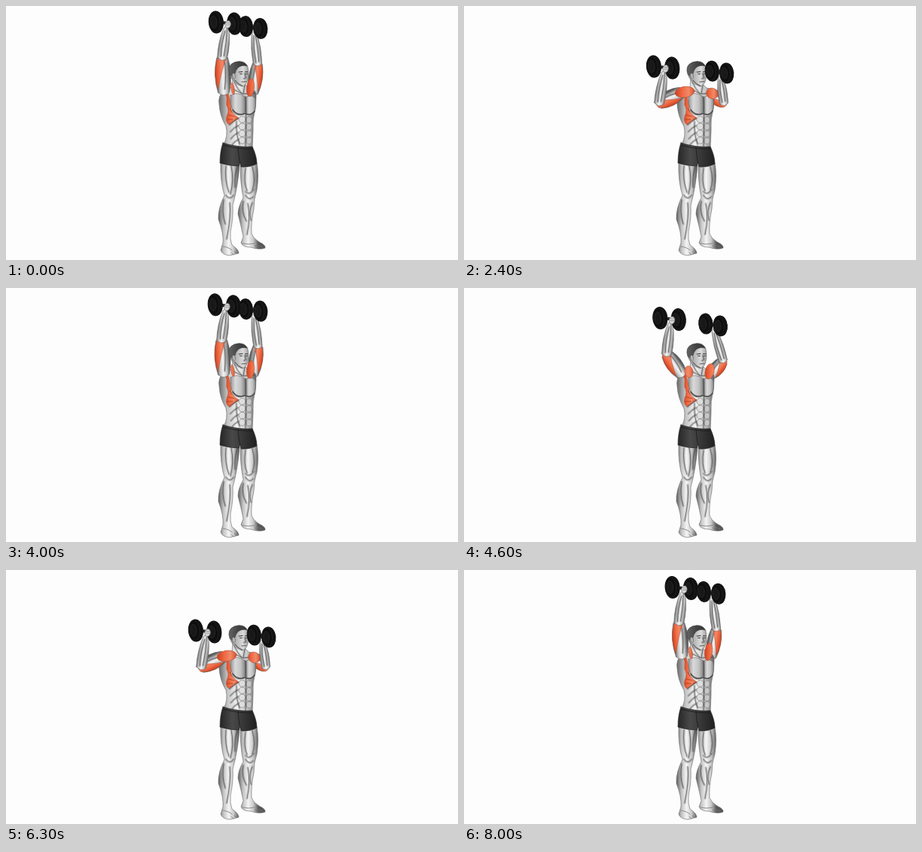
An HTML page with a canvas that plays this animation: 600 px wide and 338 px high, repeating every 8100 ms.

```html
<!DOCTYPE html>
<html lang="en">
<head>
<meta charset="utf-8">
<title>Dumbbell overhead press</title>
<style>
html, body { margin: 0; width: 100%; height: 100%; overflow: hidden; background: #fefdfe; }
canvas { display: block; width: 600px; height: 338px; }
</style>
</head>
<body>
<canvas id="stage"></canvas>
<script>
const canvas = document.getElementById('stage');
const ctx = canvas.getContext('2d');
const dpr = window.devicePixelRatio || 1;
canvas.width = 600 * dpr;
canvas.height = 338 * dpr;

const LOOP = 8100, REP = 3900, STEP = 100;
const SKIN = ['#5c5c5c', '#c4c4c4', '#f4f4f4', '#c9c9c9', '#585858'];
const PEC = ['#8c8c8c', '#d9d9d9', '#c2c2c2', '#777'];
const RED = ['#c93f1d', '#ee6640', '#f28a68', '#d34a29'];

// time within one repetition -> height of the near dumbbell
const LIFT = [[0, 22.5], [200, 24], [400, 28], [600, 35], [700, 41], [900, 53], [1100, 67.5],
  [1300, 77], [1500, 81.5], [1900, 82], [2400, 81.5], [2550, 74], [2700, 62], [3000, 42],
  [3300, 30], [3600, 24], [3900, 22.5]];

// dumbbell height -> near hand x, near elbow, far hand, far elbow
const POSES = [
  [22.5, 291, 287, 69, 328, 28.5, 334, 77],
  [30, 280, 278, 77, 328, 37.5, 339, 86],
  [41, 272.5, 269, 88, 330.5, 49, 344, 97],
  [67.5, 266, 259, 118, 336.5, 74.5, 345, 121],
  [82, 264, 259, 130, 339, 88.5, 345, 130]
];

function sample(rows, x) {
  let i = 1;
  while (i < rows.length - 1 && rows[i][0] < x) i++;
  const a = rows[i - 1], b = rows[i];
  const k = Math.min(1, Math.max(0, (x - a[0]) / (b[0] - a[0])));
  return a.slice(1).map((v, j) => v + (b[j + 1] - v) * k);
}

function ramp(x0, y0, x1, y1, colors) {
  const g = ctx.createLinearGradient(x0, y0, x1, y1);
  colors.forEach((c, i) => g.addColorStop(i / (colors.length - 1), c));
  return g;
}

function line(d, color = '#777', width = 0.8) {
  ctx.strokeStyle = color;
  ctx.lineWidth = width;
  ctx.stroke(new Path2D(d));
}

function fill(d, x0, x1, colors, edge = '#666') {
  ctx.fillStyle = ramp(x0, 0, x1, 0, colors);
  ctx.fill(new Path2D(d));
  line(d, edge, 0.6);
}

// soft shadow with a thin dark core between muscles
function groove(d) {
  line(d, 'rgba(70,70,70,.22)', 3.2);
  line(d, 'rgba(60,60,60,.75)', 0.8);
}

function oval(x, y, rx, ry, tilt, color, edge) {
  ctx.beginPath();
  ctx.ellipse(x, y, rx, ry, tilt, 0, 7);
  ctx.fillStyle = color;
  ctx.fill();
  if (edge) {
    ctx.strokeStyle = edge;
    ctx.lineWidth = 0.6;
    ctx.stroke();
  }
}

// tapered limb from a to b; half widths at start, middle and end
function limb(a, b, w0, wm, w1, detail) {
  const dx = b[0] - a[0], dy = b[1] - a[1], len = Math.hypot(dx, dy);
  ctx.save();
  ctx.translate(...a);
  ctx.rotate(Math.atan2(dy, dx));
  const d = `M0 ${-w0}Q${len / 2} ${-wm} ${len} ${-w1}Q${len + w1} 0 ${len} ${w1}` +
    `Q${len / 2} ${wm} 0 ${w0}Q${-w0} 0 0 ${-w0}Z`;
  ctx.fillStyle = ramp(0, -w0 - 1, 0, w0 + 1, SKIN);
  ctx.fill(new Path2D(d));
  line(d, '#666', 0.6);
  detail(len);
  ctx.restore();
}

function arm(shoulder, elbow, hand, side, size) {
  limb(shoulder, elbow, 7.5 * size, 13.5 * size, 7.5 * size, n => {
    const w = 8 * size * side;
    groove(`M${n * .1} ${-w * .2}Q${n * .5} ${-w * .6} ${n * .85} ${-w * .4}`);
    const tri = `M${n * .1} ${w * .9}Q${n * .6} ${w * 1.8} ${n + 3} ${w * .6}` +
      `Q${n + 6} ${-w * .5} ${n * .95} ${-w * .6}Q${n * .7} ${w * .1} ${n * .1} ${w * .9}Z`;
    ctx.fillStyle = ramp(0, w * 1.3, 0, -w * .6, RED);
    ctx.fill(new Path2D(tri));
    line(tri, '#b5482c', 0.5);
  });
  const wrist = [hand[0] + 1.5, hand[1] + 7];
  limb(elbow, wrist, 6.5 * size, 8.5 * size, 3.4, n => {
    groove(`M2 -2Q${n * .5} -4 ${n * .9} -1M3 2Q${n * .5} 3 ${n} 1`);
  });
}

function plates(x, y, rx, ry) {
  oval(x, y, rx, ry, -.08, '#0a0a0a');
  oval(x + 2, y, rx * .75, ry * .93, -.08, '#111', '#242424');
  oval(x - 2, y, rx * .72, ry * .9, -.08, '#0e0e0e', '#2b2b2b');
  oval(x - 3, y, rx * .42, ry * .55, -.08, '#181818', '#303030');
}

function dumbbell(x, y, gap, rx, ry, tilt) {
  line(`M${x - gap} ${y - tilt}L${x + gap} ${y + tilt}`, '#222', 4);
  plates(x - gap, y - tilt, rx, ry);
  plates(x + gap, y + tilt, rx, ry);
}

function fist(x, y) {
  oval(x, y, 3.8, 5, .2, '#d4d4d4', '#666');
  line(`M${x - 2} ${y - 2}h5m-5 2.5h5`, '#777', 0.6);
}

function legs() {
  fill('M311 211Q311 237 315 255Q308 267 308 277Q312 292 315 307L312 315Q314 321 325 321Q336 325 344 322' +
    'Q345 318 336 314Q328 309 326 303Q325 288 329 270Q329 256 333 245Q336 225 333 209Z', 308, 335, SKIN);
  groove('M318 216Q315 235 320 246M327 214Q332 232 327 245M318 247Q323 253 329 244M318 252Q323 260 328 254' +
    'M315 260Q312 274 319 286M321 263Q325 280 320 304M327 262Q322 272 325 285');
  line('M314 316Q322 318 330 316M333 318l7 3M330 319l6 3');
  fill('M285 207Q284 233 290 252Q281 270 282 284Q289 302 288 315L285 325Q287 331 297 332L309 329' +
    'Q309 324 300 318Q297 311 298 300Q302 281 301 265Q308 240 310 211Z', 282, 309, SKIN);
  groove('M292 213Q290 232 296 248M299 213Q303 232 298 250M307 214Q303 225 304 241M292 252Q297 259 302 252' +
    'M289 258Q286 275 291 290M297 262Q299 280 293 310');
  line('M288 320Q296 321 300 325M299 328l3 3M303 327l3 2');
}

function torso() {
  fill('M301 96L300 108L289 112Q281 120 283 131Q284 147 292 160Q295 173 289 184L327 189L328 165Q327 150 331 137' +
    'L332 122Q333 110 322 109L317 104Z', 281, 333, SKIN);
  groove('M303 101Q307 110 313 117M317 105L315 117M302 111Q310 115 315 117L330 116');
  fill('M293 121Q289 113 291 107Q298 121 299 139Q303 146 309 149Q303 153 296 158Q291 154 293 147' +
    'Q297 138 293 132Z', 290, 309, RED, '#b5482c');
  line('M295 145l8 2M294 151l7 0M297 136l3 5', '#a53818');
  fill('M298 119Q307 113 318 121Q320 138 316 144Q306 148 301 140Q297 130 298 119Z', 297, 319, PEC);
  fill('M319 121Q326 117 331 123Q333 136 328 143Q322 146 318 142Z', 318, 332, PEC);
  line('M301 138Q307 147 317 143Q324 147 330 140', '#4a4a4a', 1.4);
  for (let i = 0; i < 4; i++) {
    const y = 151 + i * 9.3;
    oval(313.5, y, 4.6, 4.4, .1, '#dedede', '#757575');
    oval(322.5, y + .5, 3.7, 4.3, .1, '#c6c6c6', '#757575');
    groove(`M${297 + i * .8} ${y + 7}Q302 ${y + 2} 308 ${y - 1}`);
  }
  groove('M318 121Q319 140 318 187M306 154Q305 170 310 184');
  fill('M288 182Q308 189 327 187Q333 200 333 210Q324 215 312 214L311 208L309 213Q296 213 284 209Q284 193 288 182Z',
    284, 333, ['#262626', '#494949', '#343434', '#202020'], '#222');
  line('M308 188Q309 202 311 210M288 185Q308 191 327 190', '#191919');
}

function head() {
  fill('M298 93Q294 78 304 75Q317 71 321 81Q323 90 321 98Q319 106 313 107Q304 104 300 97Z', 296, 324,
    ['#777', '#b4b4b4', '#dcdcdc', '#8f8f8f']);
  fill('M297 91Q293 79 303 75Q315 71 320.5 80Q313 78 308 82Q305 85 304 90L301 93Z', 295, 321,
    ['#666', '#444', '#333'], '#444');
  oval(302.5, 93, 2, 3.6, -.2, '#b5b5b5', '#666');
  line('M309 88l5 -.6M317.5 87.6l3.5 .2', '#444', 1.1);
  line('M310.5 90.4l3 0M318 90.4l2.5 0', '#444', 1);
  groove('M317 90L318.5 95.5L316 96.5');
  line('M304 99Q308 104 314 106.5', '#555', 1.2);
  line('M313 101l6 -.4', '#555', 1);
}

function draw(time) {
  const t = Math.floor(time % LOOP / STEP) * STEP;
  const [y] = sample(LIFT, t % REP);
  const [nx, ex, ey, fx, fy, gx, gy] = sample(POSES, y);
  const down = (y - 22.5) / 59.5;

  ctx.setTransform(dpr, 0, 0, dpr, 0, 0);
  ctx.fillStyle = '#fefdfe';
  ctx.fillRect(0, 0, 600, 338);
  ctx.lineCap = ctx.lineJoin = 'round';

  arm([328, 116], [gx, gy], [fx, fy], 1, .88);
  legs();
  torso();
  oval(324.5 + down * 5, 108.5 + down * 8, 5 + down * 3, 12 - down * 5, .1 + down * .4,
    ramp(319, 0, 338, 0, RED), '#b5482c');
  arm([289, 115], [ex, ey], [nx, y], -1, 1);
  oval(301 - down * 8, 110 + down * 4.5, 2 + down * 11, 8 - down * .8, -.15, ramp(280, 0, 307, 0, RED), '#b5482c');
  head();
  dumbbell(fx, fy, 9.7, 9.6, 14, 1.4);
  dumbbell(nx, y, 12.2, 10, 15, 1);
  fist(nx + 3.5, y + 2);
}

function tick(now) {
  draw(now);
  requestAnimationFrame(tick);
}
draw(0);
requestAnimationFrame(tick);
</script>
</body>
</html>
```
